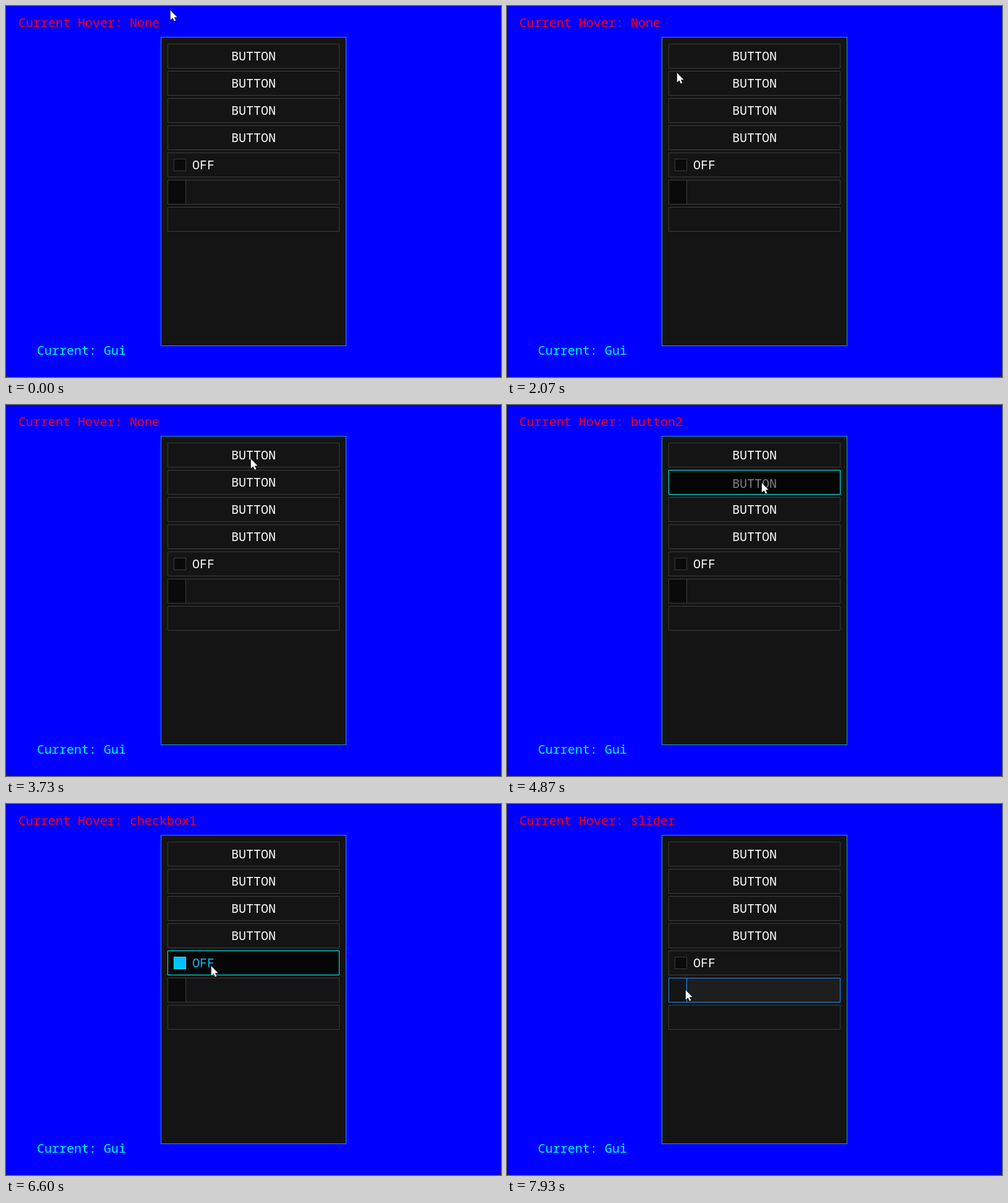
Recreate the animation shown at these times as an HTML page. Size 800 by 600 pixels, loop 8000 ms.

```html
<!DOCTYPE html>
<html lang="en">
<head>
<meta charset="utf-8">
<title>GUI hover demo</title>
<style>
  html, body { margin: 0; width: 100%; height: 100%; overflow: hidden; background: #222; }
  svg { display: block; width: 100vw; height: 100vh; }
  text { font: 500 20px "Noto Sans Mono", "DejaVu Sans Mono", monospace; white-space: pre; }
  rect { shape-rendering: crispEdges; }
</style>
</head>
<body>
<svg id="stage" viewBox="0 0 800 600"></svg>
<script>
const LOOP = 8000, FPS = 15;
const IDS = ["button", "button2", "button3", "button4", "checkbox1", "slider", "textbox"];
const CHECK = 4, SLIDER = 5;
const LEFT = 261, TOP = 61, WIDTH = 278, HEIGHT = 40, PITCH = 44;
const ACCENT = "#00bfff";
const LOOKS = {
  idle: { fill: "#141414", edge: "#3c3c3c", text: "#fff", knob: "#0a0a0a" },
  hover: { fill: "#1e1e1e", edge: "#1e90ff", text: "#fff", knob: "#141414" },
  press: { fill: "#050505", edge: "#00ffff", text: "#808080", knob: "#050505" }
};

// Pointer moves, in ticks of 1/15 s
const HOME = { x: 265, y: 6 };
const MOVES = [
  { from: 18, to: 24, x: 198, y: 58 },
  { from: 24, to: 31, x: 274, y: 107 },
  { from: 31, to: 36, x: 330, y: 84 },
  { from: 46, to: 53, x: 375, y: 130 },
  { from: 53, to: 56, x: 395, y: 86 },
  { from: 66, to: 73, x: 411, y: 125 },
  { from: 78, to: 87, x: 424, y: 224 },
  { from: 89, to: 98, x: 331, y: 261 },
  { from: 109, to: 119, x: 288, y: 300 }
];
const CLICKS = [
  { down: 60, up: 62 }, { down: 73, up: 77 }, { down: 99, up: 101 }, { down: 106, up: 108 }
];

const stage = document.getElementById("stage");

function set(el, attrs) {
  for (const key in attrs) el.setAttribute(key, attrs[key]);
}

function add(tag, attrs, label) {
  const el = document.createElementNS("http://www.w3.org/2000/svg", tag);
  set(el, attrs);
  if (label) el.textContent = label;
  return stage.appendChild(el);
}

// Box with a one pixel border inside its bounds
function box(x, y, w, h, fill, stroke) {
  return add("rect", { x: x + .5, y: y + .5, width: w - 1, height: h - 1, fill, stroke });
}

// Window with rounded bottom corners
add("rect", { y: -20, width: 800, height: 620, rx: 7, fill: "#0000ff" });
const hoverText = add("text", { x: 20, y: 34, fill: "#ff0000" });
add("text", { x: 50, y: 564, fill: "#00ffff" }, "Current: Gui");
box(250, 50, 300, 500, "#141414", "#1e9be0");

const rows = IDS.map((id, i) => {
  const y = TOP + PITCH * i;
  const row = { y, frame: box(LEFT, y, WIDTH, HEIGHT) };
  if (i < CHECK) row.label = add("text", { x: 400, "text-anchor": "middle" }, "BUTTON");
  if (i === CHECK) {
    row.knob = box(LEFT + 10, y + 10, 20, 20);
    row.label = add("text", { x: 301 });
  }
  if (i === SLIDER) row.knob = box(LEFT, y, 30, HEIGHT);
  return row;
});

const pointer = add("path", {
  d: "M.8 1v15.6l3.6-3.4 2.6 5.4 2.4-1-2.5-5.3h4.7z",
  fill: "#fff", stroke: "#000", "paint-order": "stroke"
});

// Each move speeds up towards its end
function pointerAt(tick) {
  let { x, y } = HOME;
  for (const move of MOVES) {
    const part = (tick - move.from) / (move.to - move.from);
    const f = Math.min(1, Math.max(0, part)) ** 1.6;
    x += (move.x - x) * f;
    y += (move.y - y) * f;
  }
  return { x: Math.round(x), y: Math.round(y) };
}

// Hover follows the pointer one tick late
function rowAt(tick) {
  const { x, y } = pointerAt(tick - 1);
  const depth = y - 3 - TOP;
  const inside = x >= LEFT && x < LEFT + WIDTH && depth >= 0 && depth % PITCH < HEIGHT;
  return inside ? Math.floor(depth / PITCH) : -1;
}

function draw(time) {
  const tick = Math.floor(time * FPS / 1000 + .06);
  const over = rowAt(tick);
  const pressed = CLICKS.some(c => c.down <= tick && tick < c.up);
  const toggles = CLICKS.filter(c => c.up <= tick && rowAt(c.up) === CHECK);
  const on = toggles.length % 2 === 1;

  hoverText.textContent = "Current Hover: " + (over < 0 ? "None" : IDS[over]);
  rows.forEach((row, i) => {
    const check = i === CHECK, down = i === over && pressed;
    const look = LOOKS[down ? "press" : i === over ? "hover" : "idle"];
    set(row.frame, { fill: look.fill, stroke: look.edge });
    if (row.knob) {
      const fill = !check ? look.knob : down || on ? ACCENT : LOOKS.idle.knob;
      set(row.knob, { fill, stroke: look.edge });
    }
    if (row.label) {
      const fill = check && down ? ACCENT : look.text;
      set(row.label, { y: row.y + (down && !check ? 29 : 27), fill });
    }
  });
  rows[CHECK].label.textContent = on ? "ON" : "OFF";

  const { x, y } = pointerAt(tick);
  set(pointer, { transform: `translate(${x} ${y})` });
}

const start = performance.now();
function loop() {
  draw((performance.now() - start) % LOOP);
  requestAnimationFrame(loop);
}
loop();
</script>
</body>
</html>
```
